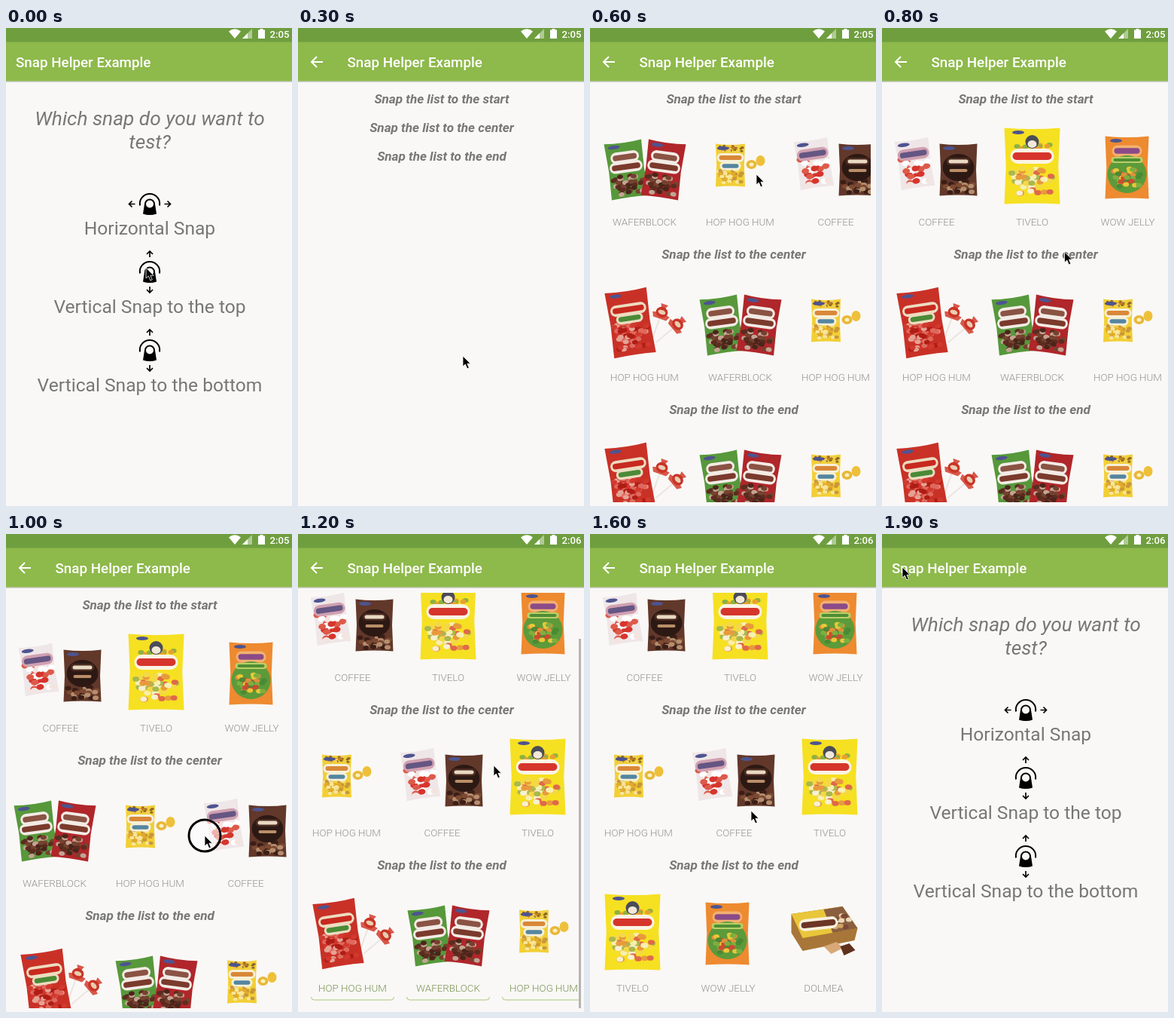
Recreate the animation shown at these times as an HTML page. Size 380 by 634 pixels, loop 2 s.

```html
<!DOCTYPE html>
<html lang="en">
<head>
<meta charset="utf-8">
<title>Snap Helper Example</title>
<style>
  html, body { margin: 0; height: 100%; overflow: hidden; background: #f9f8f6; }
  svg { display: block; width: 380px; height: 634px; font-family: Roboto, sans-serif; }
  .middle { text-anchor: middle; fill: #777; }
  .question { font-size: 26.3px; font-style: italic; }
  .option { font-size: 24.6px; }
  .heading { font-size: 17.1px; font-style: italic; font-weight: 700; }
  .label { font-size: 13.4px; font-weight: 300; fill: #929292; }
  .card { fill: none; stroke: #a9c77c; visibility: hidden; }
  .highlight .label { fill: #789252; }
  .highlight .card { visibility: visible; }
</style>
</head>
<body>
<svg id="stage" viewBox="0 0 380 634"></svg>
<script>
const STEP = 100, LOOP = 2000, ITEM = 127, ROW = 206, SNAP_INSET = 8;

// SVG string helpers
const at = (x, y, body, turn = 0) => `<g transform="translate(${x} ${y}) rotate(${turn})">${body}</g>`;
const shape = (d, fill) => `<path d="${d}" fill="${fill}"/>`;
const line = (d, color, width) => `<path d="${d}" fill="none" stroke="${color}" stroke-width="${width}"/>`;
const oval = (x, y, rx, ry, fill) => `<ellipse cx="${x}" cy="${y}" rx="${rx}" ry="${ry}" fill="${fill}"/>`;
const rect = (x, y, w, h, fill, extra = '') =>
  `<rect x="${x}" y="${y}" width="${w}" height="${h}" fill="${fill}" ${extra}/>`;
const text = (x, y, cls, words) => `<text x="${x}" y="${y}" class="${cls}">${words}</text>`;

// Seeded pieces spread over a w by h area
function scatter(x, y, w, h, size, colors) {
  const noise = n => Math.abs(Math.sin(n * 127.1) * 43758.5) % 1;
  const count = Math.round(1.6 * w * h / (size * size * 3));
  return Array.from({ length: count }, (_, i) =>
    oval(x + (noise(i + 1) - .5) * w, y + (noise(i + 500) - .5) * h, size, size * .75, colors[i % colors.length])
  ).join('');
}

// A pouch centred on x, y with a slightly drawn-in waist and a small brand oval
function bag(x, y, w, h, turn, color, body) {
  const a = w / 2, b = h / 2;
  const outline = `M${-a} ${-b}Q0 ${3 - b} ${a} ${-b}L${a * .94} 0L${a} ${b}Q0 ${b - 2} ${-a} ${b}L${-a * .94} 0Z`;
  return at(x, y, shape(outline, color) + body + oval(-a * .5, 6 - b, 8, 2.5, '#4d5490'), turn);
}

// Two-tone band standing in for lettering
const band = (y, w, h, rim, fill) =>
  rect(-w / 2, y - h / 2, w, h, rim, `rx="${h / 2}"`) +
  rect(3 - w / 2, y - h / 4, w - 6, h / 2, fill, `rx="${h / 4}"`);

const lolly = (x, y, turn) => at(x, y,
  line('M0 0L0 38', '#ece4de', 2) + shape('M-5 -11H5L0 0L12 3L9 9L-9 9L-12 3L0 0Z', '#d9584a') +
  oval(0, 0, 8, 7, '#c93528') + oval(0, 0, 5, 3, '#e9cdb0'), turn);

const choco = (x, turn, color) => bag(x, 0, 50, 75, turn, color,
  scatter(0, 20, 40, 26, 4, ['#4a251b', '#75422f', '#5b2d20', '#c4a392']) +
  band(-17, 38, 15, '#f3ebe5', '#8a5344') + band(-4, 44, 15, '#f3ebe5', '#7a3a2c'));

const products = [
  ['HOP HOG HUM',
    lolly(23, -17, 20) + lolly(44, -1, 50) +
    bag(-19, -3, 56, 87, -8.5, '#c93127',
      scatter(0, 15, 44, 42, 4, ['#e0685c', '#b01d15', '#e5a294', '#d2392e']) +
      band(-18, 48, 15, '#ecdcc0', '#c8291f') + band(-6, 36, 13, '#ecdcc0', '#4b8a37'))],
  ['WAFERBLOCK', choco(-24, -8, '#57983b') + choco(25, 8, '#b0262a')],
  ['HOP HOG HUM',
    bag(-13, -6, 39, 57, 0, '#f2cf35',
      scatter(0, -22, 34, 8, 2, ['#c77b20', '#f0d060', '#8a6a28']) +
      scatter(0, 14, 32, 20, 3, ['#e3ac2a', '#f8e69a', '#c9973a']) +
      band(-10, 36, 12, '#f6f0d8', '#d98838') + band(1, 28, 11, '#f6f0d8', '#5585a0')) +
    oval(15, -7, 7, 6, '#e8b838') + oval(15, -7, 3, 2.5, '#faf0c0') + oval(27, -12, 6, 7, '#eec03a')],
  ['COFFEE',
    bag(-29, -8, 45, 65, -8, '#efe6e8',
      scatter(0, 6, 36, 46, 5, ['#d6352c', '#fff', '#dd5a4a', '#f4e4e0']) + band(-13, 42, 15, '#d0a0b0', '#655683')) +
    bag(29, 0, 50, 69, 0, '#62382a',
      scatter(0, 22, 40, 18, 4, ['#7c4932', '#3a1e17', '#b58e6e']) +
      oval(0, -3, 21, 18, '#2d1914') + band(-11, 32, 10, '#4a2a20', '#e9d9c2') + band(1, 30, 8, '#2d1914', '#b98e68'))],
  ['TIVELO',
    bag(0, -5, 74, 101, 0, '#f6e022',
      scatter(0, -26, 48, 14, 4, ['#8fb040', '#f6e022', '#e8a030']) +
      scatter(0, 20, 54, 36, 4.5, ['#f8efb0', '#e89a3c', '#f4d848', '#a9b84c', '#f7f0d0', '#e0684a']) +
      oval(0, -32, 9, 9, '#4a4c58') + oval(0, -29, 6, 5, '#f2e8d8') + band(-13, 58, 20, '#fbf4e4', '#d6352c'))],
  ['WOW JELLY',
    bag(-1, -3, 58, 83, 0, '#ee8a30',
      band(-22, 40, 15, '#f2b070', '#8a4a88') + oval(0, 9, 26, 25, '#5c9a3a') +
      scatter(0, 13, 36, 26, 4, ['#cf4a30', '#e8c838', '#e0903a', '#7fae40', '#4a8a34']) +
      band(-10, 42, 8, '#b9d067', '#4f8d35'))],
  ['DOLMEA',
    shape('M-43 -29L25 -39L45 -10L41 6L-28 20L-43 -4Z', '#a87638') +
    shape('M-43 -29L25 -39L45 -10L-28 3Z', '#e9c63a') + shape('M0 -35L25 -39L45 -10L12 -4Z', '#8a5f40') +
    scatter(22, -19, 24, 18, 4, ['#ead8ba', '#7a4a34', '#d0a468']) +
    at(-7, -16, band(0, 52, 16, '#f8f1de', '#6c3526'), -6) +
    shape('M0 14L17 8L26 16L10 24Z', '#d9a878') + shape('M22 14L34 10L42 19L27 26Z', '#60301f')]
];

const items = products.map(([name], i) => at(72.5 + i * ITEM, 0,
  `<use href="#p${i}"/><path class="card" d="M-55 81q0 4 4 4h102q4 0 4-4"/>` + text(0, 74, 'label', name))).join('');

const sections = ['start', 'center', 'end'].map((edge, i) =>
  `<g id="section${i}">${text(191, 100, 'heading', 'Snap the list to the ' + edge)}<g id="row${i}">${items}</g></g>`);

function knob(y, turn) {
  const arrow = line('M0 -19.500V-27.500M-4 -23.500L0 -27.500L4 -23.500', '#000', 1.7);
  return at(191, y, at(0, 0, arrow, turn) + at(0, 0, arrow, turn + 180) +
    line('M-13 2A13.200 13.200 0 1 1 13 2', '#000', 2) +
    shape('M-7 0A7 7 0 0 1 7 0L9 13Q0 16 -9 13Z', '#000') + oval(0, 0, 5, 5, '#f9f8f6'));
}

const options = ['Horizontal Snap', 'Vertical Snap to the top', 'Vertical Snap to the bottom'].map((words, i) =>
  knob(i ? 219.5 + i * 104 : 233.5, i ? 0 : 90) + text(191, 274 + i * 104, 'option', words)).join('');

document.getElementById('stage').innerHTML = `
  <defs>
    ${products.map(([, art], i) => `<g id="p${i}">${art}</g>`).join('')}
    <clipPath id="view">${rect(7, 78, 366, 551, '#000')}</clipPath>
  </defs>
  ${rect(0, 0, 380, 634, '#f9f8f6')}
  <g id="menu" class="middle">
    ${text(191, 129, 'question', 'Which snap do you want to')}${text(191, 160, 'question', 'test?')}${options}
  </g>
  <g id="lists" class="middle" clip-path="url(#view)"><g id="page">${sections.join('')}</g></g>
  ${rect(373, 139, 3, 490, '#b4b4b2', 'id="scrollbar"')}
  ${rect(0, 70, 380, 2, '#00000028')}
  ${rect(0, 0, 380, 70.5, '#8eb94b')}${rect(0, 0, 380, 18.5, '#6f9e3f')}
  <g fill="#fff">
    <path d="M296 4.500Q304 -2 312 4.500L304 14Z"/>
    <path d="M314 14L327 1V14Z" opacity=".45"/><path d="M314 14L321 7V14Z"/>
    <path d="M335 2.500H337.500V1H341.500V2.500H344V14H335Z"/>
    <text id="clock" x="350.500" y="12.500" font-size="13.200" font-weight="500"></text>
    <text id="title" y="52" font-size="18.800" font-weight="500">Snap Helper Example</text>
  </g>
  <g id="back">${line('M33 45H18.500M25 38L18 45L25 52', '#fff', 2)}</g>
  <g id="pointer">
    <circle id="touch" r="21" fill="#fff" fill-opacity=".55" stroke="#000" stroke-width="3"/>
    <path d="M0 0V14L3.300 11L5.800 16.800L8.300 15.700L5.900 10.200H10.200Z" stroke="#fff" stroke-width=".8"/>
  </g>`;

const $ = id => document.getElementById(id);
const move = (id, x, y) => $(id).setAttribute('transform', `translate(${x} ${y})`);
const show = (id, on) => { $(id).style.display = on ? '' : 'none'; };
const progress = (t, from, to) => Math.min(1, Math.max(0, (t - from) / (to - from)));

// Scroll position of each row, counted in items
const rowPosition = [
  t => progress(t, 400, 600) + 2 * progress(t, 600, 800),
  t => progress(t, 800, 1000) + progress(t, 1000, 1100),
  t => 4 * progress(t, 1200, 1500)
];

// Pointer stops: time, x, y
const stops = [[100, 186, 318], [300, 219, 435], [500, 270, 194], [600, 221, 194], [1000, 264, 400],
  [1200, 260, 307], [1600, 214, 367], [1800, 25, 46], [1900, 27, 44]];
const presses = [100, 500, 1000, 1800];

function pointerAt(t) {
  const next = stops.findIndex(stop => stop[0] >= t);
  const [t1, x1, y1] = stops[next], [t0, x0, y0] = stops[Math.max(0, next - 1)];
  const p = t1 > t0 ? (t - t0) / (t1 - t0) : 1;
  return [x0 + (x1 - x0) * p, y0 + (y1 - y0) * p];
}

function draw(t) {
  const onMenu = t < 300 || t >= 1900, loaded = t >= 400, pageMoving = t === 1200;
  show('menu', onMenu);
  show('lists', !onMenu);
  show('back', !onMenu);
  show('scrollbar', pageMoving);
  show('touch', presses.includes(t));
  $('title').setAttribute('x', onMenu ? 13 : 65.5);
  $('clock').textContent = t < 1100 ? '2:05' : '2:06';
  move('page', 0, -67 * progress(t, 1100, 1200));
  rowPosition.forEach((position, i) => {
    const p = position(t);
    move('section' + i, 0, i * (loaded ? ROW : 38));
    move('row' + i, -p * ITEM - Math.min(p, 1) * i * SNAP_INSET, 188);
    show('row' + i, loaded);
  });
  $('row2').classList.toggle('highlight', pageMoving);
  move('pointer', ...pointerAt(t));
}

const start = performance.now();
function tick() {
  const elapsed = (performance.now() - start) % LOOP;
  draw(Math.floor(elapsed / STEP) * STEP);
  requestAnimationFrame(tick);
}
tick();
</script>
</body>
</html>
```
